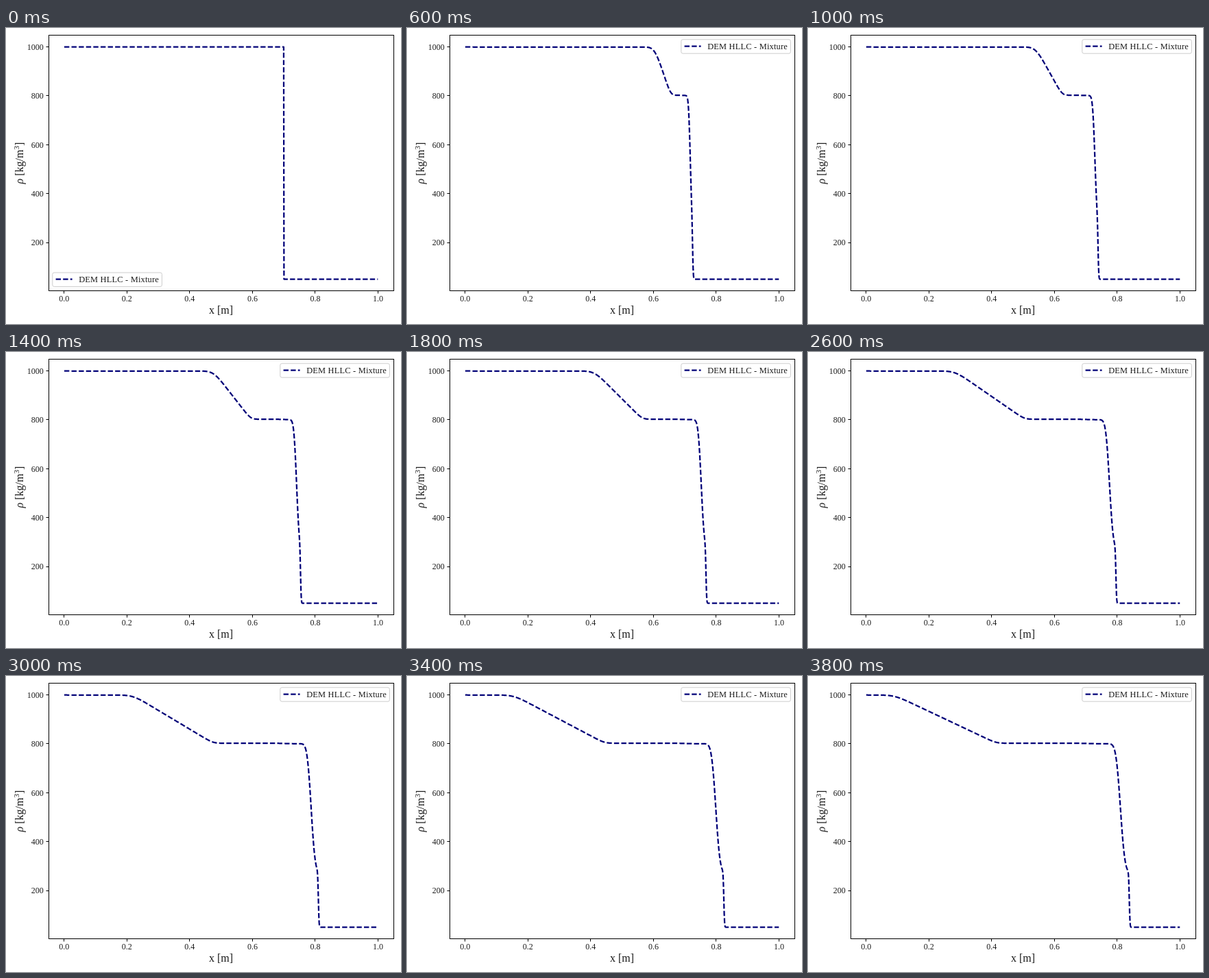
These frames come from a looping animation (576x432 px, 4 s). An HTML page:

```html
<!DOCTYPE html>
<html lang="en">
<head>
<meta charset="utf-8">
<title>Mixture density</title>
<style>
  html, body { margin: 0; width: 100%; height: 100%; overflow: hidden; background: #fff; }
  svg { display: block; width: 576px; height: 432px; }
  text { font-family: "Liberation Serif", "Times New Roman", serif; font-size: 12px; fill: #1c1c1c; }
  .label { font-size: 16px; text-anchor: middle; }
  .legend { font-size: 12.4px; letter-spacing: .2px; }
  .axis { fill: none; stroke: #000; stroke-width: 1; }
  .series { fill: none; stroke: #000078; stroke-width: 2.25; stroke-dasharray: 7.4 3.2; stroke-linejoin: round; }
</style>
</head>
<body>
<svg viewBox="0 0 576 432">
  <path id="curve" class="series"/>
  <g id="ticks"></g>
  <rect class="axis" x="62.5" y="10.5" width="503" height="373"/>
  <text class="label" x="313.6" y="417">x [m]</text>
  <text class="label" transform="translate(24.7 197.1) rotate(-90)"><tspan font-style="italic">ρ</tspan> [kg/m<tspan font-size="11" dy="-5.8">3</tspan><tspan dy="5.8">]</tspan></text>
  <g id="legend">
    <rect width="159.6" height="20.4" rx="2.4" fill="#fff" stroke="#ccc"/>
    <path class="series" d="M4.8 9.7h24"/>
    <text class="legend" x="38.4" y="13.8">DEM HLLC - Mixture</text>
  </g>
</svg>
<script>
const LOOP = 4000, STEP = 200, CELLS = 1000;
const RHO_L = 1000, RHO_STAR = 803, RHO_SHOCK = 272, RHO_R = 50;
const $ = id => document.getElementById(id);
const px = x => 84.7 + 457.8 * x;
const py = rho => 27.5 + (1000 - rho) * 0.3569;

// Normal distribution, and a ramp smoothed by it
const cdf = z => 0.5 * (1 + Math.tanh(0.79788 * (z + 0.044715 * z ** 3)));
const pdf = z => Math.exp(-z * z / 2) / Math.sqrt(2 * Math.PI);
const ramp = (u, s) => u * cdf(u / s) + s * pdf(u / s);

// Density at x after n steps: rarefaction, contact and shock leaving x = 0.7
function density(x, n) {
  if (n === 0) return x < 0.7 ? RHO_L : RHO_R;
  const head = 0.7 - 0.0321 * n, foot = 0.7 - 0.015 * n;
  const spread = Math.cbrt(n / 19);
  const slope = (RHO_L - RHO_STAR) / (foot - head);
  const fan = slope * (ramp(x - head, 0.024 * spread) - ramp(x - foot, 0.015 * spread));
  const edge = 0.8 * cdf((x - 0.025 + 0.0013 * n) / 0.004);
  const sag = 2 * cdf((x - 0.7) / 0.02);
  const top = RHO_L - fan - edge - sag;
  const contact = cdf((0.7 + 0.0058 * n - x) / (0.0026 * Math.sqrt(n)));
  const shock = cdf((0.7035 + 0.0071 * n - x) / 0.0018);
  return RHO_R + shock * (RHO_SHOCK - RHO_R + contact * (top - RHO_SHOCK));
}

function curvePath(n) {
  let d = "";
  for (let i = 0; i < CELLS; i++) {
    const x = (i + 0.5) / CELLS;
    d += (i ? "L" : "M") + px(x).toFixed(2) + " " + py(density(x, n)).toFixed(2);
  }
  return d;
}

function drawTicks() {
  const snap = v => Math.floor(v) + 0.5;
  let out = "";
  for (let i = 0; i <= 5; i++) {
    const x = px(i / 5);
    out += `<path class="axis" d="M${snap(x)} 383.5v4"/>
      <text x="${x}" y="399.3" text-anchor="middle">${(i / 5).toFixed(1)}</text>`;
  }
  for (let rho = 200; rho <= 1000; rho += 200) {
    const y = py(rho);
    out += `<path class="axis" d="M62.5 ${snap(y)}h-4"/>
      <text x="54.8" y="${y + 4.3}" text-anchor="end">${rho}</text>`;
  }
  $("ticks").innerHTML = out;
}

let shown = -1;
function render(time) {
  const n = Math.floor((time % LOOP) / STEP);
  if (n !== shown) {
    shown = n;
    $("curve").setAttribute("d", curvePath(n));
    $("legend").setAttribute("transform", n ? "translate(399.8 16.8)" : "translate(67.8 357)");
  }
}

drawTicks();
render(0);
const start = performance.now();
function tick() {
  render(performance.now() - start);
  requestAnimationFrame(tick);
}
requestAnimationFrame(tick);
</script>
</body>
</html>
```
